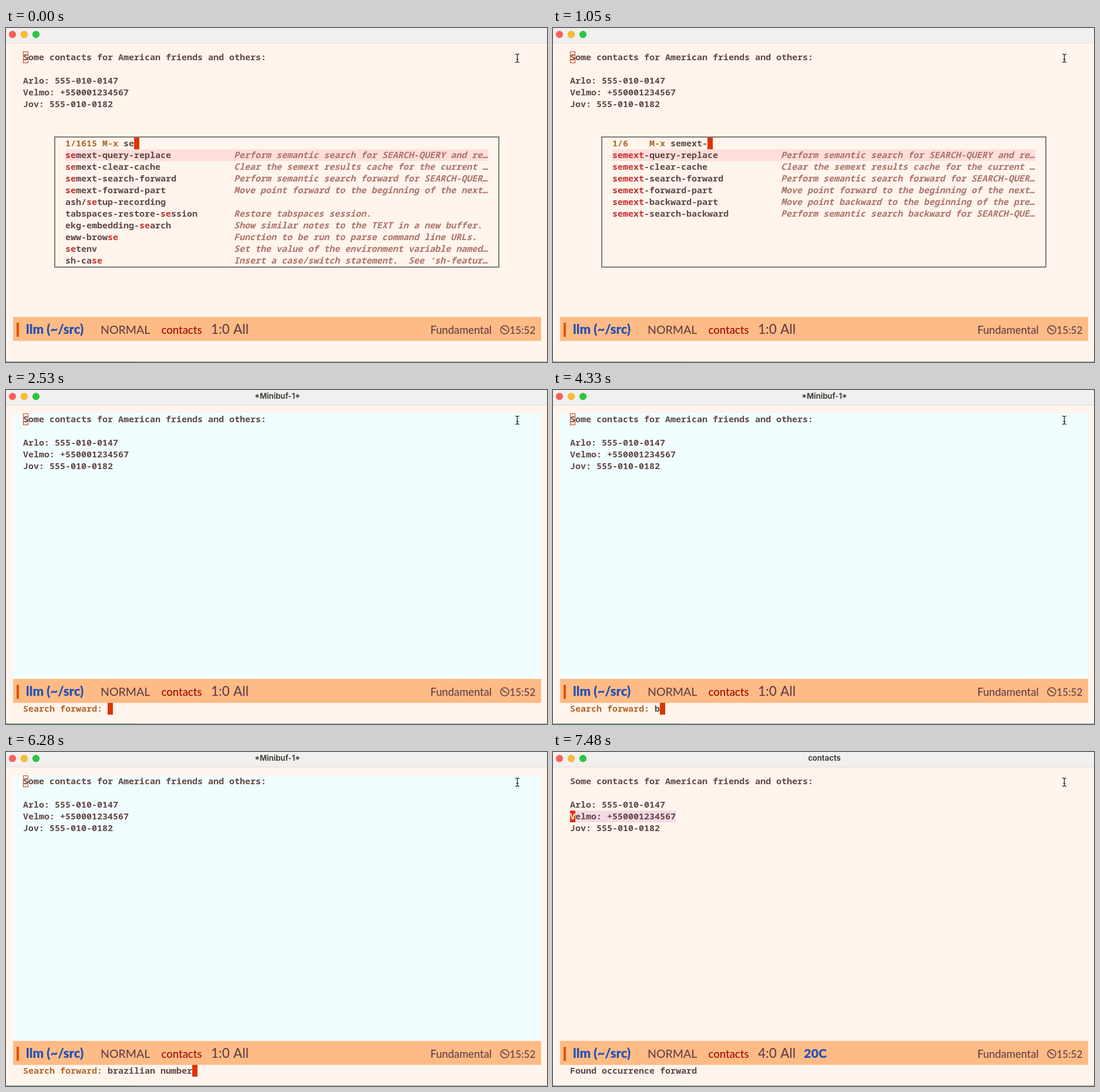
Recreate the animation shown at these times as an HTML page. Size 921 px wide and 570 px high, loop 8 s.

```html
<!DOCTYPE html>
<html lang="en">
<head>
<meta charset="utf-8">
<title>Semantic search</title>
<style>
  html, body { margin: 0; width: 100%; height: 100%; overflow: hidden; background: #fff5ec; }
  svg { display: block; width: 921px; height: 570px; }
  text { white-space: pre; }
  .mono { font: 600 15px "Noto Sans Mono", monospace; fill: #604848; }
  .note { font-style: italic; fill: #ad736b; }
  .prompt { fill: #b0672a; }
  .m0 { fill: #c4302f; font-weight: 800; }
  .m1 { fill: #008f70; font-weight: 800; }
  .inverse { fill: #fff5ec; }
  .title { font: 700 13px Inter, sans-serif; fill: #454341; text-anchor: middle; }
  .bar { font-family: Lato, sans-serif; font-weight: 500; fill: #64404a; }
  .project { font-weight: 900; fill: #2553b4; }
  .buffer { fill: #a00c08; }
  .lights { stroke: #000; stroke-opacity: .12; stroke-width: .8; }
</style>
</head>
<body>
<svg viewBox="0 0 921 570" xmlns="http://www.w3.org/2000/svg">
  <rect width="921" height="570" fill="#fff5ec"/>
  <rect width="921" height="25" fill="#f1f0ee"/>
  <rect y="25" width="921" height="1" fill="#dfdcd8"/>
  <g class="lights">
    <circle cx="11" cy="11" r="6" fill="#fe5f57"/>
    <circle cx="31" cy="11" r="6" fill="#febc2e"/>
    <circle cx="51" cy="11" r="6" fill="#28c840"/>
  </g>
  <rect y="569" width="921" height="1" fill="#a3a29c"/>
  <rect y="569" width="222" height="1" fill="#78a08c"/>
  <g id="scene"></g>
  <path d="M867 44.5h2l1.5 1.5 1.5-1.5h2M870.5 46v11M867 58.5h2l1.5-1.5 1.5 1.5h2M868.5 53.5h4" fill="none" stroke="#111" stroke-width="1.2"/>
  <rect x="12" y="493" width="899" height="41" fill="#ffbb85"/>
  <rect x="18" y="503" width="4" height="24" fill="#dd5500"/>
  <g class="bar">
    <text class="project" x="34" y="522" font-size="22">llm (~/src)</text>
    <text x="161" y="522" font-size="19.5">NORMAL</text>
    <text class="buffer" x="264.5" y="522" font-size="18.5">contacts</text>
    <text id="place" x="349" y="522" font-size="22.5">1:0</text>
    <text x="387" y="522" font-size="22.5">All</text>
    <text id="temperature" class="project" x="427" y="522" font-size="21.5"></text>
    <text x="827" y="522" font-size="18.3" text-anchor="end">Fundamental</text>
    <text x="901.5" y="522" font-size="17.2" text-anchor="end">15:52</text>
  </g>
  <g fill="none" stroke="#64404a" stroke-width="1.6">
    <circle cx="849" cy="515" r="7"/>
    <path d="M844.5 511.5l4.5 3.5 3.5 2"/>
  </g>
</svg>
<script>
const LOOP = 8000, CELL = 9, ROW = 20;
const RED = "#dc3500";
const scene = document.getElementById("scene");
const place = document.getElementById("place");
const temperature = document.getElementById("temperature");

const semext = [
  ["semext-query-replace", "Perform semantic search for SEARCH-QUERY and re…"],
  ["semext-clear-cache", "Clear the semext results cache for the current …"],
  ["semext-search-forward", "Perform semantic search forward for SEARCH-QUER…"],
  ["semext-forward-part", "Move point forward to the beginning of the next…"],
  ["semext-backward-part", "Move point backward to the beginning of the pre…"],
  ["semext-search-backward", "Perform semantic search backward for SEARCH-QUE…"]
];
const looseMatches = [
  ["ash/setup-recording", ""],
  ["tabspaces-restore-session", "Restore tabspaces session."],
  ["ekg-embedding-search", "Show similar notes to the TEXT in a new buffer."],
  ["eww-browse", "Function to be run to parse command line URLs."],
  ["setenv", "Set the value of the environment variable named…"],
  ["sh-case", "Insert a case/switch statement.  See ‘sh-featur…"]
];
const semMatches = [
  ["semantic-mode", "Toggle parser features (Semantic mode)."],
  ["global-semanticdb-minor-mode", "Toggle Semantic DB mode."],
  ["semantic-force-refresh", "Force a full refresh of the current buffer’s ta…"],
  ["semantic-symref", "Find references to the current tag."]
];

// Keystrokes: [time, text so far] and [time, characters shown]
const commandKeys = [
  [0, "se"], [150, "sem"], [300, "seme"], [600, "semex"], [750, "semext"],
  [1050, "semext-"], [1190, "semext-s"], [1340, "semext-se"],
  [1490, "semext-sea"], [1930, "semext-sear"]
];
const query = "brazilian number";
const queryKeys = [
  [0, 0], [4330, 1], [4630, 2], [4780, 3], [4930, 4], [5080, 5], [5230, 7],
  [5380, 8], [5530, 10], [5680, 12], [5980, 14], [6280, 16]
];

const latest = (keys, t) => keys.filter(([start]) => start <= t).pop()[1];
const rect = (x, y, w, h, fill) =>
  `<rect x="${x}" y="${y}" width="${w}" height="${h}" fill="${fill}"/>`;
const text = (x, top, body, cls = "") =>
  `<text class="mono ${cls}" x="${x}" y="${top + 15}">${body}</text>`;
const span = (cls, body) => `<tspan class="${cls}">${body}</tspan>`;
const cursor = (x, top, glyph = "") =>
  rect(x, top, CELL, ROW, RED) + text(x, top, glyph, "inverse");
const title = name => `<text class="title" x="462" y="15">${name}</text>`;

function contacts() {
  return text(29, 40, "Some contacts for American friends and others:") +
    text(29, 80, "Arlo: 555-010-0147") +
    text(29, 100, "Velmo: +550001234567") +
    text(29, 120, "Jov: 555-010-0182");
}

const hollowCursor =
  `<rect x="29.5" y="40.5" width="8" height="19" fill="none" stroke="${RED}"/>`;

// Each dash-separated part of the input colours its first match in the name.
function highlight(name, parts) {
  const marks = Array(name.length).fill("");
  parts.forEach((part, i) => {
    const at = name.indexOf(part);
    if (part && at >= 0) marks.fill("m" + i, at, at + part.length);
  });
  let out = "";
  for (let i = 0, j; i < name.length; i = j) {
    for (j = i; j < name.length && marks[j] === marks[i]; j++);
    out += span(marks[i], name.slice(i, j));
  }
  return out;
}

function candidates(input, parts) {
  if (input === "se") return ["1/1615", [...semext.slice(0, 4), ...looseMatches]];
  if (input === "sem") return ["1/38", [...semext, ...semMatches]];
  const tail = parts[1] || "";
  const rows = semext.filter(([name]) => name.includes(tail));
  return ["1/" + rows.length, rows];
}

function commandList(t) {
  const input = latest(commandKeys, t);
  const parts = input.split("-");
  const [count, rows] = candidates(input, parts);
  const pending = t >= 450 && t < 600 ? "x" : "";
  return contacts() + hollowCursor +
    `<rect x="83" y="186" width="756" height="222" fill="#fff5ec" stroke="#7e7c7a" stroke-width="2"/>` +
    rect(101, 207, 720, ROW, "#ffdedb") +
    text(101, 187, span("prompt", count.padEnd(7) + "M-x ") + input) +
    cursor(200 + CELL * input.length, 187, pending) +
    rows.map(([name, note], i) =>
      text(101, 207 + ROW * i, highlight(name, parts)) +
      text(388, 207 + ROW * i, note, "note")).join("");
}

function searchPrompt(t) {
  const shown = latest(queryKeys, t);
  return title("*Minibuf-1*") + rect(12, 40, 899, 453, "#f1feff") +
    contacts() + hollowCursor +
    text(29, 534, span("prompt", "Search forward: ") + query.slice(0, shown)) +
    cursor(173 + CELL * shown, 534);
}

function searching() {
  return title("contacts") + contacts() + cursor(29, 40, "S") +
    text(29, 534, "Searching...");
}

function found() {
  return title("contacts") + rect(29, 100, 180, ROW, "#f3dae5") + contacts() +
    cursor(29, 100, "V") + text(29, 534, "Found occurrence forward");
}

function view(t) {
  if (t < 2530) return commandList(t);
  if (t < 6580) return searchPrompt(t);
  return t < 7480 ? searching() : found();
}

let drawn = "";
function render(t) {
  const next = view(t);
  if (next === drawn) return;
  drawn = next;
  scene.innerHTML = next;
  place.textContent = t < 7480 ? "1:0" : "4:0";
  temperature.textContent = t < 7480 ? "" : "20C";
}

const begin = performance.now();
function tick() {
  render((performance.now() - begin) % LOOP);
  requestAnimationFrame(tick);
}
tick();
</script>
</body>
</html>
```
